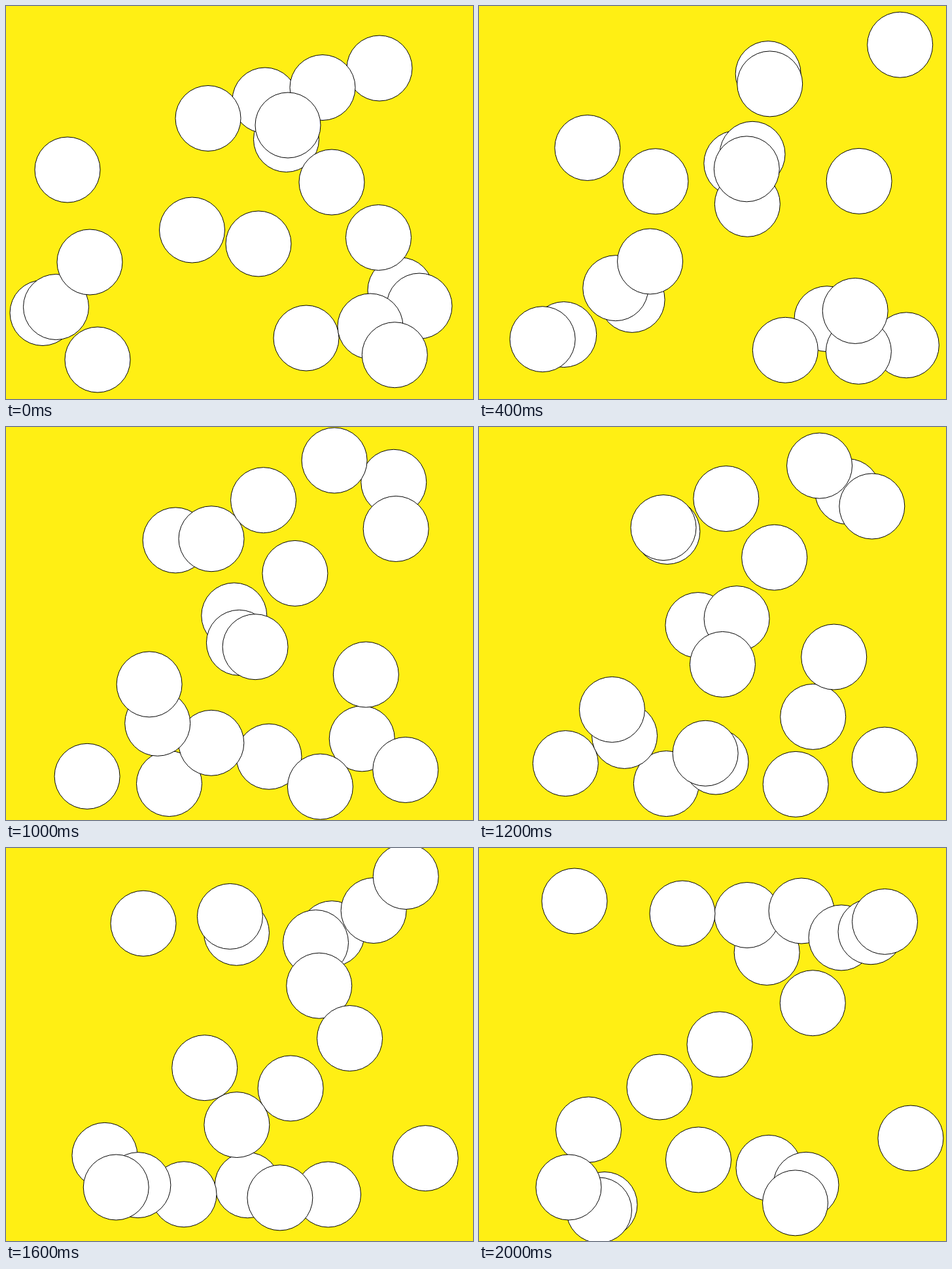
Write an HTML page with a canvas that moves like this. It is 714x600 px and loops after 2100 ms.

```html
<!DOCTYPE html>
<html lang="en">
<head>
<meta charset="utf-8">
<title>Bouncing circles</title>
<style>
html, body { margin: 0; width: 100%; height: 100%; overflow: hidden; background: #ffef14; }
canvas { display: block; }
</style>
</head>
<body>
<canvas id="stage" width="714" height="600"></canvas>
<script>
const canvas = document.getElementById('stage');
const ctx = canvas.getContext('2d');
const W = canvas.width, H = canvas.height, R = 50;
const STEP = 100, STEPS = 21;

// Launch state of each ball, back to front: x, y, then velocity per tick
const balls = [
  [571, 95, 7.27, -3.577],
  [428.5, 203.5, -3.466, 3.67],
  [56, 468.5, -9.214, 3.306],
  [603, 434, 8.393, 8.38],
  [632, 458, -10, 1.966],
  [76.5, 459.5, 2.068, 4.92],
  [94, 250, 7.18, -3.352],
  [459, 507, 0.932, 1.83],
  [498, 269, -8, -4.273],
  [386, 363, 2.432, -6.068],
  [140, 540, 9.41, -9.16],
  [396, 144, 4.614, -4.043],
  [557, 489, 2.34, 3.83],
  [484, 124.5, -3.932, -0.557],
  [128, 391, 8.08, 3.97],
  [594.3, 532.7, -1.91, -6.727],
  [569.5, 353.5, 1.16, -8.61],
  [284.5, 342, -2.295, 4.795],
  [431, 182, -2.17, 6.682],
  [309, 171.5, -3.909, 9.625]
];

// Two ticks per step, with an occasional extra one
function ticksAt(step) {
  return 2 * step + Math.floor((step + 2) / 6) + (step >= 2 ? 1 : 0);
}

// A ball turns round on the tick after it crosses a wall
function travel(p, v, size, ticks) {
  for (let i = 0; i < ticks; i++) {
    p += v;
    if (p < R || p > size - R) v = -v;
  }
  return p;
}

function draw(step) {
  const ticks = ticksAt(step);
  ctx.fillStyle = '#ffef14';
  ctx.fillRect(0, 0, W, H);
  ctx.fillStyle = '#fff';
  ctx.strokeStyle = '#000';
  for (const [x, y, vx, vy] of balls) {
    ctx.beginPath();
    ctx.arc(travel(x, vx, W, ticks), travel(y, vy, H, ticks), R, 0, Math.PI * 2);
    ctx.fill();
    ctx.stroke();
  }
}

const start = performance.now();
function frame() {
  const time = performance.now() - start;
  draw(Math.floor(time / STEP) % STEPS);
  requestAnimationFrame(frame);
}
frame();
</script>
</body>
</html>
```
